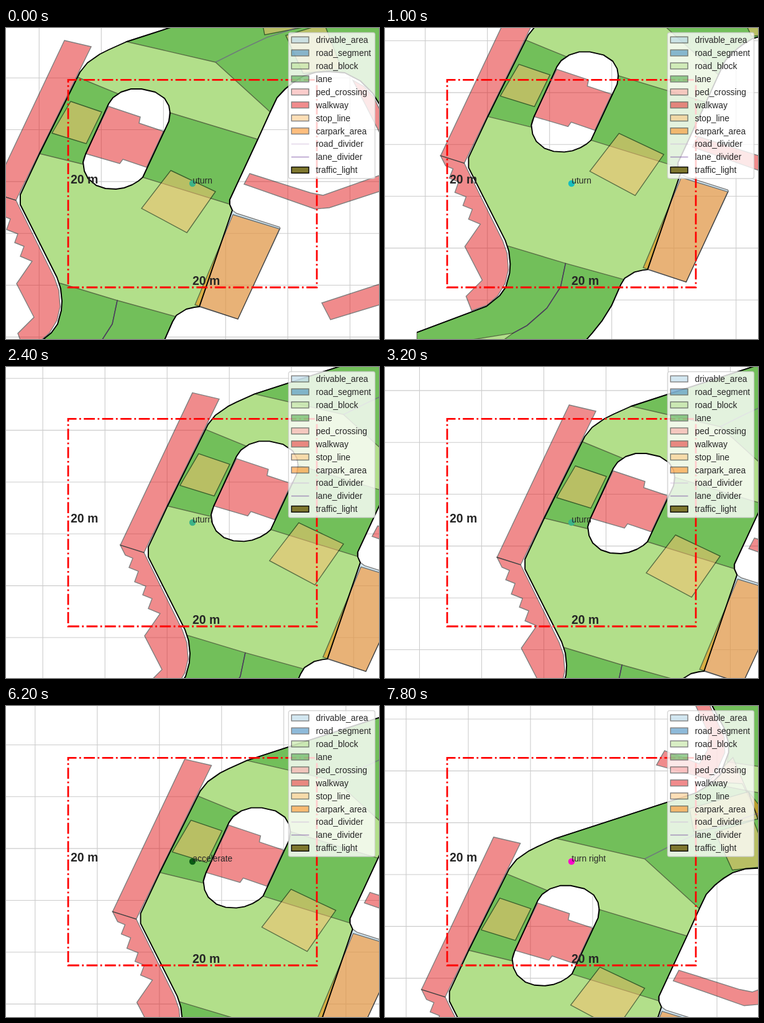
Animation of 600 by 500 pixels, one loop 8 s. Source, as an HTML page:

```html
<!DOCTYPE html>
<html lang="en">
<head>
<meta charset="utf-8">
<title>Driving map</title>
<style>
html, body { margin: 0; width: 100%; height: 100%; overflow: hidden; background: #fff; }
svg { display: block; font: 13.89px "Liberation Sans", Arial, sans-serif; fill: #262626; }
.grid { stroke: #ccc; stroke-width: 1.1; }
.road { fill: #b2df8a; fill-rule: evenodd; }
.edge { fill: none; stroke: #000; stroke-width: 1.9; stroke-linejoin: round; }
.area { stroke: #000; stroke-width: 1.39; opacity: .5; }
.drivable_area { fill: #a6cee3; }
.road_segment { fill: #1f78b4; }
.road_block { fill: #b2df8a; }
.lane { fill: #33a02c; }
.ped_crossing { fill: #fb9a99; }
.walkway { fill: #e31a1c; }
.stop_line { fill: #fdbf6f; }
.carpark_area { fill: #ff7f00; }
.traffic_light { fill: #7e772e; }
.key.traffic_light { opacity: 1; }
.divider { fill: none; stroke-width: 1.6; opacity: .5; }
.road_divider { stroke: #cab2d6; }
.lane_divider { stroke: #6a3d9a; }
.frame { fill: none; stroke: #f00; stroke-width: 2.78; stroke-dasharray: 17.8 4.45 2.78 4.45; }
.size { font-size: 19.44px; font-weight: bold; }
.legend { fill: #fff; fill-opacity: .8; stroke: #ccc; stroke-opacity: .8; stroke-width: 1.39; }
</style>
</head>
<body>
<svg width="600" height="500" viewBox="0 0 600 500">
  <g id="map">
    <path id="grid" class="grid"/>
    <path class="area drivable_area" d="M364 293L371 298L440 320L441 322L373 468L311 448Z"/>
    <path id="road" class="road"/>

    <path class="area lane" d="M115 79L181 106Q170 112 165 122L128 203Q123 210 124 219L54 202Z"/>
    <path class="area lane" d="M263 136L405 179L359 277V283L220 240L262 150Z"/>
    <path class="area lane" d="M86 410L179 438L171 476L149 510L117 538L95 550L-60 575V549L52 507L73 490L83 476L89 454L90 439Z"/>
    <path class="area lane" d="M179 438L273 464L268 472L253 506L238 530L222 550L200 575H60L95 550L117 538L149 510L171 476Z"/>
    <path class="area lane" d="M194 22L337 55L425 135L436 112L455 93L479 77L499 71L519 70L545 72L570 85L590 105L601 123L640 160V-30L500 -55L444 -66L419 -51Z"/>
    <path class="area lane" d="M472 -116L470 -101L640 -76V-220H430L465 -155L472 -131Z"/>

    <path class="area ped_crossing" d="M439 -69L479 -108L519 -13L504 -46L494 -66Z"/>

    <path class="area walkway" d="M94 20L137 30L16 277L-22 265Z"/>
    <path class="area walkway" d="M-22 265L-14 281L-2 286L-8 301L7 307L1 324L19 331L14 345L29 351L23 367L42 375L17 411L45 465L19 491L28 514L53 505L70 490L82 470L87 448L85 422L78 402L16 277Z"/>
    <path class="area walkway" d="M165 126L216 143L214 153L253 166L226 224L188 211L183 218L128 202Z"/>
    <path class="area walkway" d="M392 234L490 265L510 269L640 223V250L520 289L497 291L383 251Z"/>
    <path class="area walkway" d="M508 442L640 399V433L522 469Z"/>
    <path class="area walkway" d="M558 84L576 94L592 112L610 150V186Z"/>
    <path class="area walkway" d="M415 -200H438L465 -141L466 -116L455 -91L440 -73L356 -96L369 -119L425 -98L438 -120L440 -146Z"/>

    <path class="area stop_line" d="M104 118L154 135L129 186L74 169Z"/>
    <path class="area stop_line" d="M265 229L337 263L291 329L218 290Z"/>
    <path class="area stop_line" d="M450 12L512 -7L540 66L478 73Z"/>
    <path class="area stop_line" d="M409 -26L504 -53L519 -9L416 11Z"/>
    <path class="area carpark_area" d="M365 300L440 323L373 468L304 445Z"/>
    <path class="area carpark_area" d="M504 -53L519 -9L530 -9V-20Z"/>

    <path class="divider lane_divider" d="M179 438L171 476L149 510L117 538L95 550"/>
    <path class="divider lane_divider" d="M337 55L375 36L420 15L455 4L530 -22"/>
    <path id="edges" class="edge"/>
  </g>

  <path class="frame" d="M100 417H500V83.3H100Z"/>
  <text class="size" x="104" y="250">20 m</text>
  <text class="size" x="300" y="413.3">20 m</text>
  <circle id="car" cx="300" cy="250" r="5.2"/>
  <text id="action" x="300.3" y="250"></text>
  <g id="legend"><rect class="legend" x="454.5" y="7.5" width="139" height="234.5" rx="3"/></g>
</svg>
<script>
const $ = id => document.getElementById(id);

const leftEdge = "M-60 549L52 507L73 490L83 476L89 454L90 439L88 419L82 401L23 284V268L54 202L115 79L119 71L131 56L151 42L165 35L194 22L419 -51L444 -66L459 -81L472 -116V-131L465 -155L430 -220";
const rightEdge = "640 160L601 123L590 105L570 85L545 72L519 70L499 71L479 77L464 86L449 98L436 112L425 135L405 179L360 276V284L364 293L311 448L303 449L290 452L274 462L268 472L253 506L238 530L222 550L200 575";
const island = "M128 203L165 122L172 112L185 103L201 98H218L240 103L255 113L262 125L264 137L262 150L220 240L213 246L203 252L190 257L177 259L160 258L145 253L132 242L126 230L124 216Z";
$("road").setAttribute("d", `${leftEdge}H640L${rightEdge}H-60Z${island}`);
$("edges").setAttribute("d", `${leftEdge}M${rightEdge}${island}`);

let lines = "";
for (let i = -5; i < 8; i++) {
  lines += `M${153.3 + 100 * i} -300V700M-300 ${80.2 + 83.33 * i}H700`;
}
$("grid").setAttribute("d", lines);

const layers = ["drivable_area", "road_segment", "road_block", "lane", "ped_crossing", "walkway",
  "stop_line", "carpark_area", "road_divider", "lane_divider", "traffic_light"];
$("legend").innerHTML += layers.map((name, i) => {
  const y = 24 + 20.93 * i;
  const key = name.endsWith("divider")
    ? `<path class="divider ${name}" d="M459 ${y - 4.9}h28.5"/>`
    : `<rect class="area key ${name}" x="459.3" y="${y - 9.8}" width="27.8" height="9.8"/>`;
  return `${key}<text x="498.5" y="${y}">${name}</text>`;
}).join("");

// step, map shift x and y, shift per step x and y
const track = [
  [0, 0, 0, 14.5, -19.5],
  [3, 57, -49.3, 24, -11.5],
  [8, 185, -34, 16.5, 15.5],
  [11, 205.5, 11, 1, 12],
  [16, 202.2, 41, -.7, 2.4],
  [24, 197.5, 53, -.2, .4],
  [31, 193.5, 65.6, -2.2, 5.5],
  [39, 80.7, 190.8, -27, 19]
];

// first step, label, dot colour
const actions = [
  [0, "uturn", "#3cb488"],
  [2, "uturn", "#17bebe"],
  [6, "uturn", "#3cb488"],
  [20, "stop", "#ff0000"],
  [28, "accelerate", "#0a5a14"],
  [35, "turn right", "#ff00cc"]
];

function shift(step, axis) {
  const i = Math.max(1, track.findIndex(k => k[0] >= step));
  const a = track[i - 1], b = track[i];
  const span = b[0] - a[0], u = (step - a[0]) / span, w = 1 - u;
  return a[axis] * w * w * (1 + 2 * u) + b[axis] * u * u * (3 - 2 * u)
    + span * u * w * (a[axis + 2] * w - b[axis + 2] * u);
}

function draw(now) {
  const step = Math.floor(now / 200) % 40;
  const [, label, color] = actions.filter(a => a[0] <= step).pop();
  $("map").setAttribute("transform", `translate(${shift(step, 1).toFixed(2)} ${shift(step, 2).toFixed(2)})`);
  $("car").setAttribute("fill", color);
  $("action").textContent = label;
}

const start = performance.now();
function tick() {
  draw(performance.now() - start);
  requestAnimationFrame(tick);
}
tick();
</script>
</body>
</html>
```
